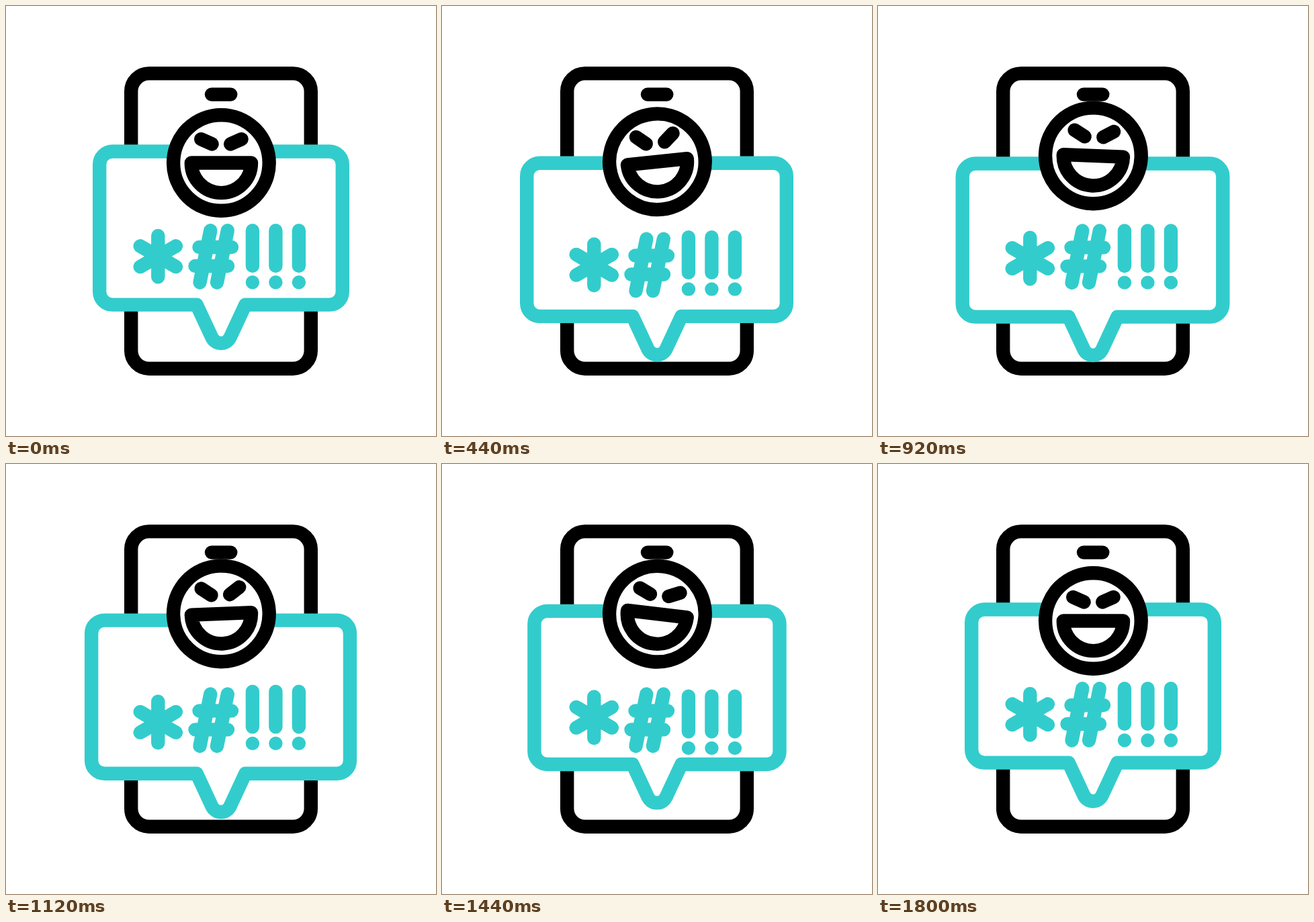
An HTML page for the animation above (2 s loop, 640 by 640 pixels).

```html
<!DOCTYPE html>
<html lang="en">
<head>
<meta charset="utf-8">
<title>Angry message</title>
<style>
  html, body { margin: 0; height: 100%; overflow: hidden; background: #fff; }
  svg { display: block; width: 100%; height: 100%; }
  .line { fill: none; stroke: #000; stroke-width: 20.4; stroke-linecap: round; stroke-linejoin: round; }
  .teal { stroke: #3cc; }
  .white { fill: #fff; }
</style>
</head>
<body>
<svg viewBox="0 0 640 640">
  <g class="line">
    <rect x="186.2" y="100.4" width="267.6" height="439.3" rx="26.6"/>
    <path d="M306 131.6h28.3"/>
    <g class="teal">
      <path id="bubble" class="white"/>
      <path id="star"/>
      <path id="hash"/>
      <path id="marks"/>
    </g>
    <!-- the face is drawn around its own centre -->
    <g id="face">
      <circle class="white" r="71.3"/>
      <path d="M-44.6 0H44.6A44.6 44.6 0 0 1 -44.6 0Z"/>
      <path id="browL" d="M-13.8 -28.1l-16.4 -7.2"/>
      <path id="browR" d="M13.8 -28.1l16.4 -7.2"/>
    </g>
  </g>
</svg>
<script>
const LOOP = 2000, END = 1800, STEP = 40;
const el = id => document.getElementById(id);
const shape = (id, d) => el(id).setAttribute('d', d);
const move = (id, value) => el(id).setAttribute('transform', value);
const clamp = (v, lo, hi) => Math.max(lo, Math.min(hi, v));
const smooth = u => u * u * (3 - 2 * u);

// Ease from 0 to 1 with Bezier handles (1/3, 0) and (x2, 1).
function ease(u, x2) {
  let lo = 0, hi = 1;
  for (let i = 0; i < 24; i++) {
    const s = (lo + hi) / 2, r = 1 - s;
    if (r * r * s + 3 * r * s * s * x2 + s * s * s < u) lo = s; else hi = s;
  }
  return smooth(lo);
}

const ramp = (t, from, to, x2 = 2 / 3) => ease(clamp((t - from) / (to - from), 0, 1), x2);
// Eased swing between 0 (even n) and 1 (odd n).
const wave = n => smooth(1 - Math.abs(1 - n % 2));

function bubblePath(k) {
  const left = 139.2 - 13.5 * k, right = 500.8 + 12.5 * k, top = 216.5, bottom = 444.6, r = 19.3;
  const corner = (x, y) => `a${r} ${r} 0 0 1 ${x * r} ${y * r}`;
  return `M${left + r} ${top}H${right - r}${corner(1, 1)}V${bottom - r}${corner(-1, 1)}` +
    `H356.3l-22.8 48.9a15 15 0 0 1 -27 0L283.7 ${bottom}H${left + r}${corner(-1, -1)}V${top + r}${corner(1, -1)}Z`;
}

function drawSymbols() {
  let star = '', hash = '', marks = '';
  for (let i = 0; i < 3; i++) {
    const a = Math.PI * (i / 3 + 0.5), x = 30.7 * Math.cos(a), y = 30.7 * Math.sin(a);
    star += `M${226.3 - x} ${372.7 - y}l${2 * x} ${2 * y}`;
    marks += `M${366.9 + 34.5 * i} 334.2v52.5m0 24.6h.01`;
  }
  for (let i = 0; i < 2; i++)
    hash += `M${304.3 + 25.5 * i} 334.2l-15.8 77.3M${287.5 - 6 * i} ${359 + 28 * i}h48.5`;
  shape('star', star);
  shape('hash', hash);
  shape('marks', marks);
}

function draw(t) {
  const grow = ramp(t, 0, 600, 0.13) - ramp(t, 1000, END, 0.13);
  shape('bubble', bubblePath(grow));
  move('bubble', `translate(0 ${18 * grow})`);

  ['star', 'hash', 'marks'].forEach((id, i) => {
    const own = clamp(t - 80 * i, 0, 1600);
    move(id, `translate(0 ${12.9 * wave(own / 400)})`);
  });

  // The face dips, jumps up and rocks from side to side before it settles.
  const lift = 10.6 * (ramp(t, 0, 240) - 2 * ramp(t, 240, 600) + ramp(t, 1400, END));
  const rock = wave(clamp(t, 400, 1400) / 200);
  const force = ramp(t, 0, 400) - ramp(t, 1400, 1600);
  move('face', `translate(320.4 ${233.5 + lift}) rotate(${7.5 * force * (2 * rock - 1)})`);
  const frown = 18.5 * force * (1 - rock);
  move('browL', `rotate(${frown} -13.8 -28.1)`);
  move('browR', `rotate(${-frown} 13.8 -28.1)`);
}

function tick() {
  const t = performance.now() % LOOP;
  draw(Math.min(END, Math.floor(t / STEP) * STEP));
  requestAnimationFrame(tick);
}

drawSymbols();
tick();
</script>
</body>
</html>
```
